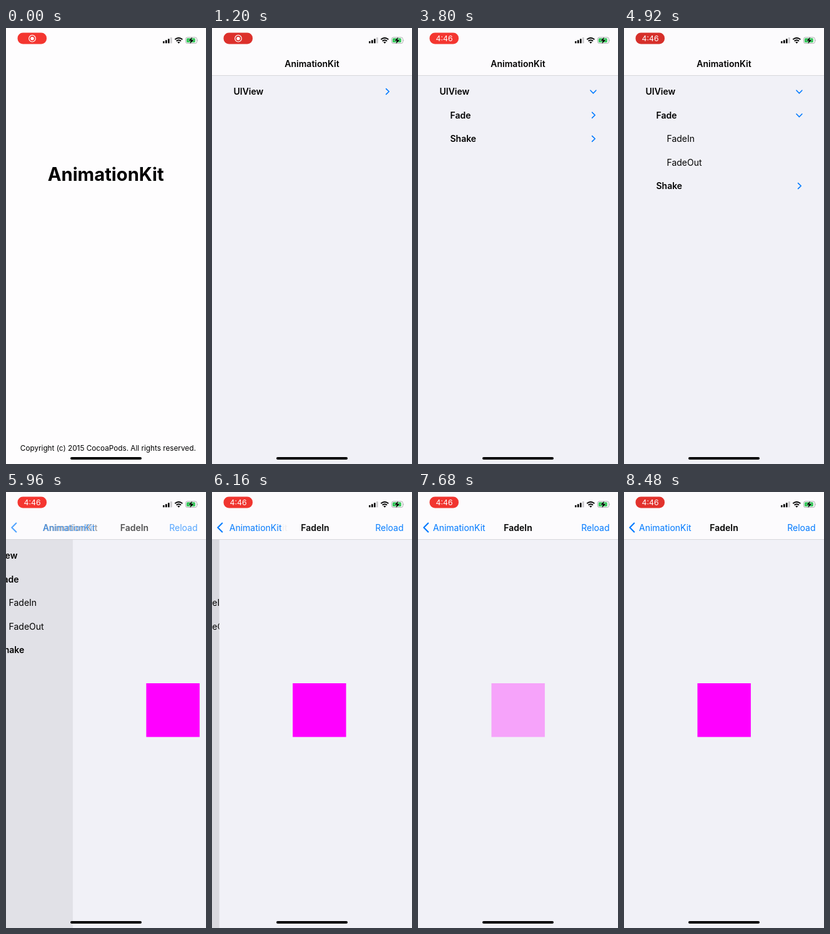
Animation of 320x693 px, one loop 8520 ms. Source, as an HTML page:

```html
<!DOCTYPE html>
<html lang="en">
<head>
<meta charset="utf-8">
<title>AnimationKit</title>
<style>
html, body { margin: 0; width: 100%; height: 100%; overflow: hidden; background: #f1f1f7; }
svg { display: block; width: 320px; height: 693px; font: 14px Inter, Roboto, sans-serif; }
.semi { font-weight: 600; }
.mid { text-anchor: middle; }
.blue { fill: #007aff; }
.line { fill: none; stroke: #007aff; stroke-linecap: round; stroke-linejoin: round; }
</style>
</head>
<body>
<svg viewBox="0 0 320 693">
  <rect width="320" height="693" fill="#f1f1f7"/>
  <g id="list"></g>
  <rect id="dim" y="75" width="320" height="618"/>
  <g id="detail">
    <rect y="75" width="320" height="618" fill="#f1f1f7"/>
    <rect id="box" x="117.5" y="304" width="85.4" height="85.4" fill="#f0f"/>
  </g>

  <rect width="320" height="75" fill="#fcfbfd"/>
  <rect y="75" width="320" height=".8" fill="#d2d2d6"/>
  <text id="title" class="semi mid" x="160" y="61.5">AnimationKit</text>
  <g id="bar">
    <path class="line" d="M16.3 49.5l-7 7 7 7" stroke-width="2.1"/>
    <text id="back" class="blue" x="24" y="61.5">AnimationKit</text>
    <text id="next" class="semi mid" x="160" y="61.5">FadeIn</text>
    <text id="reload" class="blue" x="306.5" y="61.5" text-anchor="end">Reload</text>
  </g>

  <g id="splash">
    <rect width="320" height="693" fill="#fefdfe"/>
    <text class="mid" x="159.7" y="243" font-size="29.2" font-weight="700">AnimationKit</text>
    <text class="mid" x="163.3" y="672.3" font-size="11.75">Copyright (c) 2015 CocoaPods. All rights reserved.</text>
  </g>

  <rect id="pill" x="18.5" y="7.5" width="46.5" height="18" rx="8.5"/>
  <g id="record" fill="#fff">
    <circle cx="42" cy="16.7" r="5.3" fill="none" stroke="#fff" stroke-width="1.2"/>
    <circle cx="42" cy="16.7" r="2.7"/>
  </g>
  <text id="clock" class="mid" x="42" y="21" font-size="12.3" fill="#fff">4:46</text>

  <path d="M251 21h2.6v3.3H251zM255 19.3h2.6v5H255zM259 17.3h2.6v7H259z"/>
  <path d="M263 15h2.6v9.3H263z" fill="#c9c8cb"/>
  <g fill="none" stroke="#000" stroke-width="1.9">
    <path d="M270.3 18.3q6-5 12 0M272.6 20.8q3.7-3 7.4 0"/>
  </g>
  <path d="M274.2 22.5q2.1-1.6 4.2 0l-2.1 2.2z"/>
  <rect x="287.4" y="14.9" width="18" height="9.6" rx="2.8" fill="none" stroke="#a5a5a8" stroke-width=".9"/>
  <rect x="288.8" y="16.3" width="14" height="6.8" rx="1.6" fill="#34c759"/>
  <path d="M306.5 18.2q1.5 1.5 0 3z" fill="#a5a5a8"/>
  <path d="M298 14.2l-6 6.1h3.6l-1.3 5 6-6.2h-3.7z" stroke="#fff" stroke-width=".6" paint-order="stroke"/>
  <rect x="103" y="682" width="114" height="4" rx="2"/>
</svg>
<script>
const LOOP = 8520, PITCH = 37.5;
const $ = id => document.getElementById(id);
const fade = (id, a) => $(id).setAttribute("opacity", a);
const move = (el, x, y = 0) => el.setAttribute("transform", `translate(${x} ${y})`);
const ease = (t, start, length) => {
  const p = Math.min(1, Math.max(0, (t - start) / length));
  return p * p * (3 - 2 * p);
};
const spring = (t, start) => {
  const w = Math.max(0, t - start) * 0.0142;
  return 1 - (1 + w) * Math.exp(-w);
};

// Each row: label, indent level, has a chevron
const rows = [["UIView", 0, 1], ["Fade", 1, 1], ["FadeIn", 2], ["FadeOut", 2], ["Shake", 1, 1]];
$("list").innerHTML = rows.map(([label, level, group]) =>
  `<g><text x="${34.5 + 17 * level}" y="106" class="${group ? "semi" : ""}">${label}</text>` +
  (group ? '<path class="line" d="M278.6 96.6l4.6 4.4-4.6 4.4" stroke-width="1.6"/>' : "") + "</g>").join("");
const rowEls = [...$("list").children];

function drawList(t) {
  const open = ease(t, 2600, 340), inner = ease(t, 4400, 340);
  const places = [0, 1, 2, 3, 2 + 2 * inner];
  const alphas = [1, open, inner, inner, open];
  rowEls.forEach((el, i) => {
    move(el, 0, places[i] * PITCH);
    el.setAttribute("opacity", alphas[i]);
  });
  [open, inner].forEach((p, i) =>
    rowEls[i].lastChild.setAttribute("transform", `rotate(${90 * p} 280.4 101)`));
}

function draw(t) {
  drawList(t);

  const push = spring(t, 5800);
  move($("list"), -96 * push);
  fade("dim", 0.1 * push);
  move($("detail"), 320 * (1 - push));
  move($("title"), -86 * push);
  move($("back"), 104 * (1 - push));
  move($("next"), 136 * (1 - push));
  fade("title", 1 - push);
  fade("bar", push);

  const pressed = ease(t, 7150, 60) - ease(t, 7240, 220);
  fade("reload", 1 - 0.7 * pressed);
  fade("box", t < 7300 ? 1 : ease(t, 7300, 1000));

  const glow = 0.5 + 0.5 * Math.cos((t - 5900) * Math.PI / 1000);
  $("pill").setAttribute("fill", `rgb(${214 + 31 * glow},${47 + 7 * glow},${42 + 6 * glow})`);
  const time = ease(t, 2200, 300);
  fade("record", 1 - time);
  fade("clock", time);

  fade("splash", 1 - ease(t, 760, 300));
}

const begin = performance.now();
function tick() {
  draw((performance.now() - begin) % LOOP);
  requestAnimationFrame(tick);
}
tick();
</script>
</body>
</html>
```
